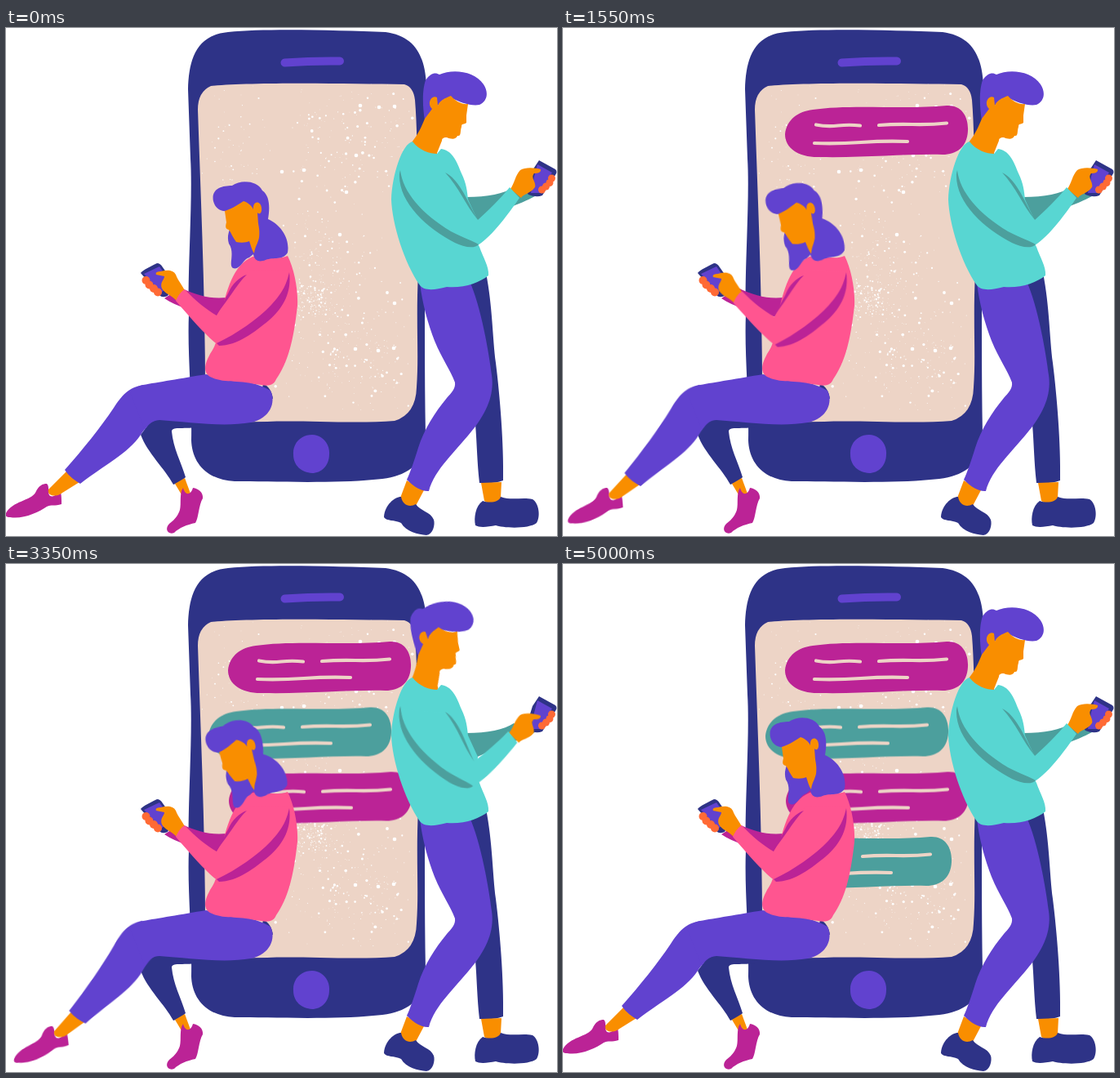
Write an HTML page that moves like this. It is 675 px wide and 622 px high and loops after 5.5 s.

```html
<!DOCTYPE html>
<html lang="en">
<head>
<meta charset="utf-8">
<title>Chatting</title>
<style>
html, body { margin: 0; width: 100%; height: 100%; overflow: hidden; background: #fff; }
svg { display: block; width: 100%; height: 100%; }
.navy { fill: #2e3387; }
.purple { fill: #6142cf; }
.skin { fill: #f98e00; }
.pink { fill: #ff5590; }
.magenta { fill: #bb2396; }
.aqua { fill: #58d6d2; }
.teal { fill: #4c9f9d; }
.coral { fill: #ff6a35; }
.cream { fill: #edd4c6; }
.lines { fill: none; stroke: #edd4c6; stroke-width: 4.2; stroke-linecap: round; }

.move { animation: 5.5s cubic-bezier(.37, 0, .63, 1) infinite; }
.leg { transform-origin: 165px 462px; animation-name: leg; }
.shoe { transform-origin: 68px 558px; animation-name: shoe; }
.her-head { transform-origin: 310px 275px; animation-name: her-head; }
.his-head { transform-origin: 512px 148px; animation-name: his-head; }
.her-arm { transform-origin: 345px 300px; animation-name: her-arm; }
.his-arm { transform-origin: 485px 178px; animation-name: his-arm; }
.bubble.magenta { transform-origin: 478px 149.5px; }
.bubble.teal { transform-origin: 290px 149.5px; }
.b1 { animation-name: b1; }
.b2 { animation-name: b2; }
.b3 { animation-name: b3; }
.b4 { animation-name: b4; }

@keyframes leg {
  0%, 36.36%, 71.45%, 100% { transform: none; }
  18.18%, 54% { transform: rotate(-5.7deg); }
}
@keyframes shoe {
  0%, 36.36%, 71.45%, 100% { transform: none; }
  18.18%, 54% { transform: rotate(-2deg); }
}
@keyframes her-head {
  0%, 18.18%, 80%, 100% { transform: none; }
  36.36%, 61.82% { transform: rotate(-8.2deg); }
}
@keyframes his-head {
  0%, 28.18%, 72%, 100% { transform: none; }
  46.36%, 54.18% { transform: rotate(-18.3deg); }
}
@keyframes her-arm {
  0%, 5.82%, 16%, 26.73%, 36.91%, 47.64%, 57.82%, 68.55%, 78.73%, 100% { transform: none; }
  10.91%, 31.82%, 52.73%, 73.64% { transform: rotate(-5.7deg); }
}
@keyframes his-arm {
  0%, 17.27%, 24.55%, 37.27%, 44.55%, 57.27%, 64.55%, 77.27%, 84.55%, 100% { transform: none; }
  20.91%, 40.91%, 60.91%, 80.91% { transform: rotate(4.3deg); }
}
@keyframes b1 { 0%, 8.18% { transform: scale(0); } 15.45%, 100% { transform: none; } }
@keyframes b2 { 0%, 30% { transform: scale(0); } 37.27%, 100% { transform: none; } }
@keyframes b3 { 0%, 51.82% { transform: scale(0); } 59.09%, 100% { transform: none; } }
@keyframes b4 { 0%, 73.64% { transform: scale(0); } 80.91%, 100% { transform: none; } }
</style>
</head>
<body>
<svg viewBox="0 0 675 622" preserveAspectRatio="none">
  <defs>
    <path id="screen" d="M235 100Q235 78 251 71C300 66 420 68 488 69Q499 72 501 88C506 150 502 230 505 300C502 360 506 400 503 440Q502 473 476 481C430 485 360 480 320 482L244 483C245 350 239 220 235 100Z"/>
    <clipPath id="clip"><use href="#screen"/></clipPath>
    <g id="bubble">
      <path d="M306 100C350 93 420 100 470 95C488 94 497 108 496 126C495 146 482 155 465 155C420 154 370 159 315 158C290 159 272 148 272 130C274 112 288 102 306 100Z"/>
      <path class="lines" d="M310 118.5Q323 121 337 119.500T364 119.500M387 119Q405 117.500 428 118T470 116.500M308 141Q335 142 365 140T422 139"/>
    </g>
  </defs>

  <!-- Big phone -->
  <path class="navy" d="M223 75C224 40 232 9 272 5C320 0 410 3 465 5C500 10 513 32 515 70C516 150 511 330 514 500C512 536 490 551 450 553C400 558 320 555 280 555C245 553 228 532 227 505C228 450 222 400 224 350C222 300 229 210 226 160Z"/>
  <use href="#screen" class="cream"/>
  <path d="M341.5 42.5Q375 40 409 40.5" fill="none" stroke="#6142cf" stroke-width="10" stroke-linecap="round"/>
  <path class="purple" d="M352 522C351 508 362 498 375 498C388 498 397 510 396 522C396 536 386 545 375 545C362 544 352 536 352 522Z"/>
  <g id="specks" fill="#fff" clip-path="url(#clip)"></g>

  <g class="move bubble magenta b1"><use href="#bubble"/></g>
  <g transform="translate(-24 80.5)"><g class="move bubble teal b2"><use href="#bubble"/></g></g>
  <g transform="translate(1 159.5)"><g class="move bubble magenta b3"><use href="#bubble"/></g></g>
  <g transform="translate(-20 239)"><g class="move bubble teal b4"><use href="#bubble"/></g></g>

  <!-- Woman -->
  <path class="navy" d="M165 498L180 478L235 483V489C215 491 203 488 203 494C205 515 214 530 220 550C215 555 210 557 205 559C195 540 173 520 165 498ZM315 436C322 438 326 446 327 454L312 450Z"/>
  <path class="skin" d="M207 558L216 573L226 570L219 551Z"/>
  <path class="magenta" d="M217 563C219 572 226 573 229 563C236 564 242 569 241 576C236 584 236 600 232 606C222 608 212 612 206 618C198 621 194 613 200 607C208 601 211 596 213 590C215 582 212 570 217 563Z"/>
  <g class="move leg">
    <g class="move shoe">
      <path class="magenta" d="M0 594C8 579 30 579 36 569C40 560 45 558 50 558C54 561 50 570 54 573C60 575 64 569 66 563C68 570 68 577 68 583C60 586 55 583 50 586C40 593 20 602 5 599C0 599-1 597 0 594Z"/>
    </g>
    <path class="skin" d="M76 541L52 565C50 573 60 574 66 571L90 556Z"/>
    <path class="purple" d="M168 437C150 440 142 450 132 465C115 490 95 515 72 541C78 550 85 554 91 558C120 535 150 521 165 498C172 488 178 480 188 480L196 455Z"/>
  </g>
  <path class="purple" d="M245 424C215 429 185 434 168 437C160 439 155 442 152 446L170 492C175 484 180 480 188 480C220 482 265 489 300 483C324 478 331 458 324 444C300 430 270 430 245 424Z"/>
  <path class="magenta" d="M271 330C250 332 235 328 214 318L194 331C208 341 230 347 262 354Z"/>
  <path class="pink" d="M302 280C315 277 332 285 345 279C353 295 358 320 357 340C352 385 345 410 331 430C327 440 318 438 305 436C285 431 265 435 250 427C239 420 246 407 250 399C258 388 261 375 263 352C270 322 278 290 302 280Z"/>
  <g class="move her-head">
    <path class="purple" d="M254 212C251 197 264 193 277 193C287 186 307 186 314 199C324 206 323 222 321 234C337 241 348 258 345 275C339 285 328 280 318 284C308 288 304 283 303 277L298 281C290 283 287 297 278 294C272 291 281 275 273 264C270 255 274 246 277 240L271 224C262 225 256 220 254 212Z"/>
    <path class="skin" d="M268 224C278 221 286 215 291 212C297 214 301 218 303 222C302 211 312 211 313 220C314 227 310 229 308 226L309 239C310 245 311 249 310 257C308 265 305 268 304 276C301 272 300 266 298 261C294 263 287 263 282 262C278 257 276 251 273 247C268 246 269 242 270 238Z"/>
  </g>
  <path class="navy" d="M165 300Q166 297 185 288Q189 288 192 293L206 313L198 328Q191 331 188 327Z"/>
  <path class="purple" d="M169 301L188 292L203 314L190 324Z"/>
  <g class="coral">
    <circle cx="171.5" cy="309" r="5"/><circle cx="175.5" cy="314.5" r="5"/>
    <circle cx="181" cy="319" r="5"/><circle cx="186" cy="323.5" r="5"/>
  </g>
  <g class="move her-arm">
    <path class="skin" d="M184 302Q182 298 190 298C197 296 205 296 208 302C211 310 217 316 219 322L209 334C203 327 195 326 191 319C188 312 194 308 194 304Z"/>
    <path class="pink" d="M219 320C232 334 246 345 258 352L273 326L298 296L345 298L347 320C337 350 300 372 262 389C252 384 232 362 208 334C211 327 215 322 219 320Z"/>
    <path class="magenta" d="M347 299C350 322 341 342 322 358C305 372 283 389 261 389L258 386C283 374 308 357 325 339C340 323 344 312 347 299ZM295 302C284 312 276 328 257 352L272 325C277 313 286 305 295 302Z"/>
  </g>

  <!-- Man -->
  <path class="navy" d="M562 300H588C596 340 596 380 600 410C605 450 610 510 609 554C600 558 590 557 580 557C577 530 577 510 575 485Z"/>
  <path class="skin" d="M582 557L586 579C595 585 605 582 606 575L607 556ZM491 554L482 578C488 588 500 588 503 583L512 566Z"/>
  <path class="navy" d="M484 574C476 574 464 584 463 599C466 604 476 602 484 606C490 617 505 620 515 621C523 620 526 608 524 602C520 592 508 592 502 583C495 587 486 585 484 574ZM584 579C575 585 573 600 575 609C580 612 590 611 600 609C608 612 640 614 650 606C655 598 653 582 645 577C632 574 620 579 606 574C604 581 592 582 584 579Z"/>
  <path class="purple" d="M507 312C510 338 517 362 525 383C534 405 545 420 550 434C551 442 545 447 540 453C525 471 512 492 505 514C500 530 495 545 491 553C500 562 510 568 518 567C525 540 550 520 575 488C592 465 598 445 595 425C592 400 582 340 567 308Z"/>
  <path class="teal" d="M564 207C590 207 610 203 622 195L648 206C630 216 600 225 574 238Z"/>
  <g class="move his-head">
    <path class="purple" d="M513 113C510 95 510 75 514 64C520 55 526 54 531 57C546 50 574 52 585 69C592 80 589 90 580 94C570 96 556 91 544 85C536 86 532 90 528 97L522 104Z"/>
    <path class="skin" d="M522 99C515 93 521 81 528 85L529 95C532 88 538 86 545 83C551 90 559 94 566 93L564 107L564 116C561 119 558 116 558 121C556 127 558 133 553 132C551 137 545 136 540 134C535 134 534 136 534 138L528 153C530 172 495 168 497 140C505 130 509 121 513 111Z"/>
  </g>
  <path class="aqua" d="M498 139C506 150 520 154 528 154L533 148C547 150 552 163 558 178C564 190 565 200 566 210L578 236C577 252 576 262 580 268C584 280 592 292 591 303C580 312 560 319 540 317C525 321 512 322 507 315C488 288 473 240 472 210C473 180 485 142 498 139Z"/>
  <path class="navy" d="M653 162L673 173Q676 176 673 180L657 205Q650 208 640 204L637 200L645 174Z"/>
  <path class="purple" d="M651 167L669 177L654 202L643 202L647 182Z"/>
  <g class="coral">
    <circle cx="668.5" cy="184" r="4.5"/><circle cx="666" cy="189.5" r="4.5"/>
    <circle cx="661.5" cy="194" r="4.5"/><circle cx="656.5" cy="198" r="4.5"/>
  </g>
  <g class="move his-arm">
    <path class="skin" d="M655 173Q656 178 647 178C642 184 650 188 648 195C642 203 634 203 631 208L618 197C623 190 624 180 630 174C636 170 648 171 655 173Z"/>
    <path class="aqua" d="M617 195C605 210 590 224 578 235L558 205L538 178L485 178C490 220 530 250 574 268C588 262 607 240 629 208Z"/>
    <path class="teal" d="M483 174C486 201 510 228 545 249C560 257 573 261 579 265C574 271 560 268 550 263C515 245 480 213 482 178ZM538 177C555 186 562 205 578 235C563 217 555 195 538 177Z"/>
  </g>
</svg>
<script>
// Seeded paint specks on the phone screen
let seed = 7;
const rnd = () => (seed = seed * 16807 % 2147483647) / 2147483647;
const bell = () => (rnd() + rnd() + rnd() - 1.5) / 1.5;
const specks = document.getElementById('specks');
const dot = (x, y, r) => {
  const c = document.createElementNS('http://www.w3.org/2000/svg', 'circle');
  for (const [k, v] of Object.entries({ cx: x, cy: y, r })) c.setAttribute(k, v.toFixed(1));
  specks.append(c);
};
const spray = (n, x, y, w, h, size) => {
  while (n--) dot(x + bell() * w, y + bell() * h, .4 + size * rnd() ** 4);
};
spray(170, 420, 135, 120, 95, 1.5);
spray(180, 385, 290, 85, 95, 1.3);
spray(130, 378, 335, 40, 36, .9);
spray(210, 425, 400, 120, 105, 1.5);
spray(70, 275, 160, 55, 120, .8);
[[457, 97], [434, 95], [476, 96], [429, 156], [417, 201], [365, 174], [338, 176],
 [428, 393], [456, 395], [475, 392], [476, 337], [409, 253]].forEach(([x, y]) => dot(x, y, 2.3));
</script>
</body>
</html>
```
